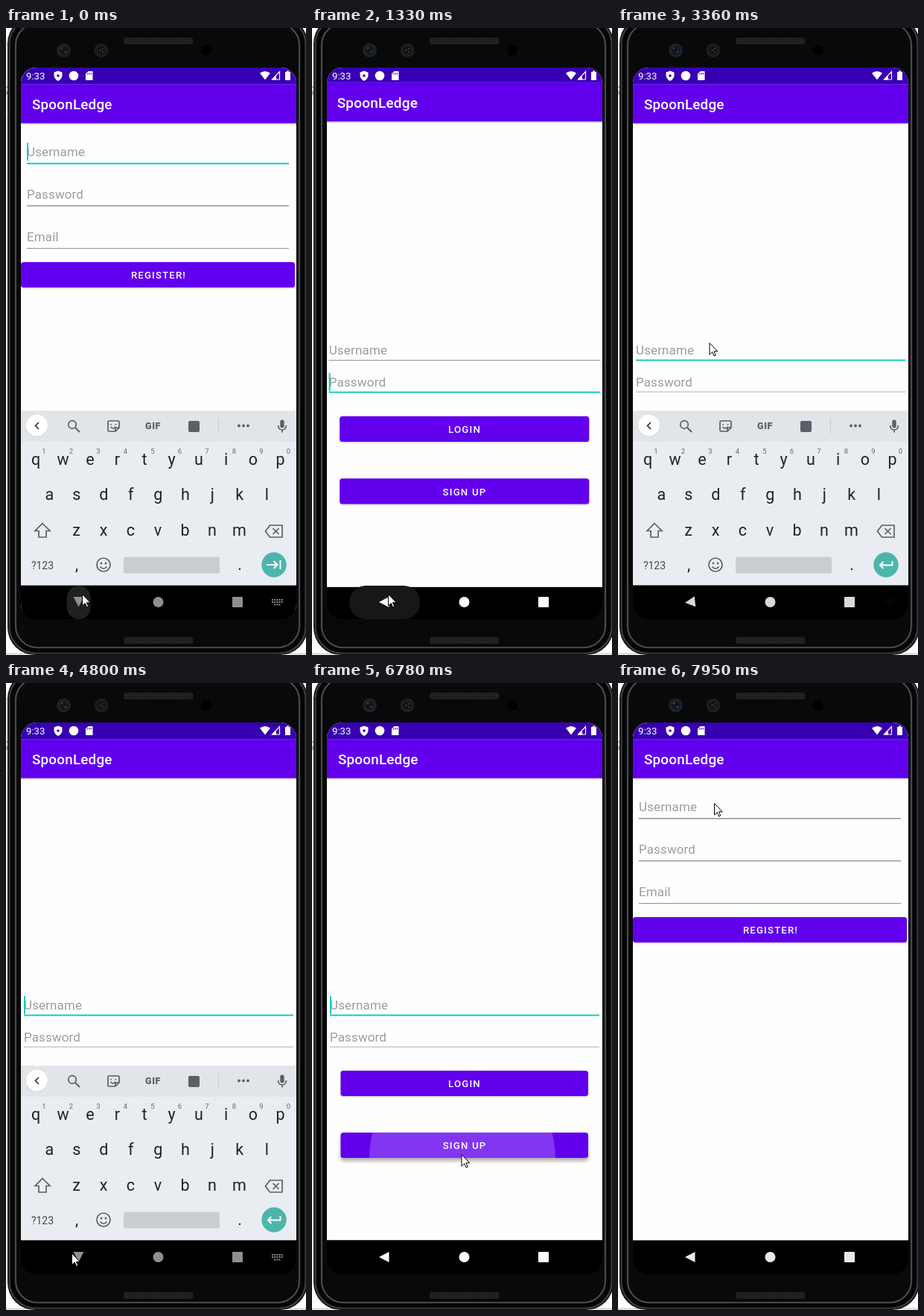
An HTML page that plays this animation: 403x841 px, repeating every 8000 ms.

```html
<!DOCTYPE html>
<html lang="en">
<head>
<meta charset="utf-8">
<title>Phone sign-up flow</title>
<style>
html, body { margin: 0; width: 100%; height: 100%; overflow: hidden; background: #fff; }
svg { display: block; width: 403px; height: 841px; font-family: Roboto, Inter, sans-serif; }
.title { font-size: 18.83px; font-weight: 500; letter-spacing: .2px; fill: #fff; }
.hint { font-size: 16.95px; letter-spacing: .15px; fill: #9c9c9c; }
.label { font-size: 13.18px; font-weight: 500; letter-spacing: 1.18px; fill: #fff; text-anchor: middle; }
.key { font-size: 21.5px; fill: #17262c; text-anchor: middle; }
.digit { font-size: 9.5px; fill: #5f6a70; text-anchor: middle; }
.icon { fill: none; stroke: #596166; stroke-width: 1.7; }
.btn { fill: #6200ee; }
.raised { filter: drop-shadow(0 1.5px 1px rgba(0,0,0,.25)); }
.teal { fill: #12cdbd; }
</style>
</head>
<body>
<svg viewBox="0 0 403 841">
  <defs>
    <clipPath id="screen"><rect x="20" y="53" width="370" height="740" rx="21"/></clipPath>
    <clipPath id="signClip"><rect x="38.5" y="603" width="332.5" height="34" rx="3.5"/></clipPath>
    <clipPath id="kbClip"><rect x="20" y="500" width="370" height="247.5"/></clipPath>
    <pattern id="mesh" width="3" height="3" patternUnits="userSpaceOnUse">
      <rect width="3" height="3" fill="#191919"/><circle cx="1.5" cy="1.5" r=".9" fill="#303030"/>
    </pattern>
    <linearGradient id="bar" x2="0" y2="1">
      <stop stop-color="#000" stop-opacity=".22"/><stop offset="1" stop-color="#000" stop-opacity="0"/>
    </linearGradient>
  </defs>

  <g id="phone">
    <path d="M0 22H3M0 121H3M0 839.5H403" stroke="#bbb"/>
    <path d="M0 79H2M0 84Q3 87 0 90" fill="none" stroke="#555"/>
    <rect x="2" y="-16" width="403" height="857" rx="37" fill="#111"/>
    <g fill="none">
      <rect x="4.5" y="-13.5" width="398" height="852" rx="35" stroke="#3b3f40" stroke-width="2"/>
      <rect x="8.5" y="-10" width="390" height="845" rx="32" stroke="#050505" stroke-width="5"/>
      <rect x="13" y="-6" width="381" height="837" rx="29" stroke="#55595a" stroke-width="1.6"/>
    </g>
    <rect x="14.5" y="-5" width="378" height="834.5" rx="28" fill="#090909"/>
    <rect x="158" y="13" width="93" height="9" rx="3" fill="url(#mesh)"/>
    <rect x="158" y="817" width="93" height="9" rx="3" fill="url(#mesh)"/>
    <circle cx="77.500" cy="30" r="9.500" fill="#1b2127"/><circle cx="77.500" cy="30" r="5.500" fill="#10161b"/>
    <path d="M74 28l2-2M79 33l2-2" stroke="#41586a" stroke-width="1.5"/>
    <circle cx="128" cy="30" r="9.500" fill="#1d1d1e"/><circle cx="128" cy="30" r="5" fill="#111"/>
    <path d="M125.500 30h2M129 28h1.500M129 32h1.500" stroke="#555" stroke-width="1.500"/>
    <circle cx="269" cy="30" r="7" fill="#000"/>
  </g>

  <g clip-path="url(#screen)">
    <rect x="20" y="53" width="370" height="740" fill="#000"/>
    <g id="login"></g>
    <g id="register"></g>
    <g clip-path="url(#kbClip)"><g id="board"></g></g>

    <g fill="#fff">
      <text x="27" y="69" font-size="13.2">9:33</text>
      <path d="M70 57.500L75.500 59.500V64Q75 68.500 70 71Q65 68.500 64.500 64V59.500Z"/>
      <circle cx="70" cy="64" r="1.800" fill="#3700b3"/>
      <circle cx="91" cy="64" r="6.300"/>
      <path d="M110.500 58H116.500V70H107V61.500Z"/>
      <path d="M109.700 60.500v2M112 60v2.500M114.300 60v2.500" stroke="#3700b3"/>
      <path d="M341 60.500Q348 55.500 355 60.500L348 69.500Z"/>
      <path d="M357.500 69H367.500V58.500Z" fill="none" stroke="#fff" stroke-width="1.200"/>
      <path d="M357 69.500H363V63.500Z"/>
      <path d="M375 59H377V57.500H380V59H382V70H375Z"/>
    </g>

    <rect id="navRipple" y="748" height="45" rx="22"/>
    <g id="nav">
      <path id="back" d="M90 770L103.500 763V777Z"/>
      <circle cx="204.500" cy="770" r="7"/>
      <rect x="304" y="763" width="14" height="14" rx="1"/>
    </g>
    <path id="kbIcon" d="M357 767h15M357 770h15M360 773.500h9" stroke="#8f8f8f" stroke-width="1.800" stroke-dasharray="2 1.200"/>
  </g>

  <path id="mouse" d="M.5 .5V16L4.200 12.600L6.700 18L8.800 17L6.400 11.800H11.300Z" fill="#fff" stroke="#000" stroke-width="1"/>
</svg>

<script>
const LOOP = 8000;
const STEPS = [0, 120, 270, 390, 510, 670, 970, 1090, 1210, 1330, 1480, 1610, 1760, 1910, 2060, 2210,
  2640, 2790, 2940, 3090, 3210, 3600, 3720, 3840, 3960, 4080, 4230, 4380, 4530, 4680, 4800,
  5330, 5450, 5580, 5730, 5880, 6010, 6140, 6290, 6410,
  6780, 6900, 7020, 7150, 7290, 7430, 7560, 7690, 7810, 7950];
const $ = id => document.getElementById(id);
const set = (id, attrs) => { for (const k in attrs) $(id).setAttribute(k, attrs[k]); };
const within = (t, ...spans) => spans.some(([a, b]) => t >= a && t < b);

// Linear interpolation through [time, value, ...] rows, held at both ends
function track(rows, t) {
  const n = rows.findIndex(r => r[0] > t);
  if (n === 0) return rows[0].slice(1);
  if (n < 0) return rows[rows.length - 1].slice(1);
  const a = rows[n - 1], b = rows[n], p = (t - a[0]) / (b[0] - a[0]);
  return a.slice(1).map((v, i) => v + (b[i + 1] - v) * p);
}

const text = (cls, x, y, s, id = '') => `<text class="${cls}" id="${id}" x="${x}" y="${y}">${s}</text>`;
const rect = (x, y, w, h, more) => `<rect x="${x}" y="${y}" width="${w}" height="${h}" ${more}/>`;
const button = (x, y, w, label, id) =>
  rect(x, y, w, 34, `rx="3.5" class="btn raised" id="${id}"`) + text('label', 205, y + 22.2, label);
const field = (x, y, w, lineY, label, id, grey) =>
  text('hint', x, y, label, id + 'Text') +
  rect(x, lineY, w, 1.2, `fill="${grey}" id="${id}Line"`) +
  `<g class="teal">${rect(x, lineY - .4, w, 2, `id="${id}Focus"`)}${rect(x, y - 18, 2, 24, `id="${id}Caret"`)}</g>`;

const page = body =>
  rect(20, 53, 370, 694.5, 'fill="#fefefe"') + rect(20, 53, 370, 22.5, 'fill="#3700b3"') +
  rect(20, 127.5, 370, 3, 'fill="url(#bar)"') + rect(20, 75.3, 370, 52.4, 'fill="#6200ee"') +
  text('title', 35, 109, 'SpoonLedge') + body + rect(20, 747.5, 370, 80, 'fill="#000"');

$('login').innerHTML = page(
  field(24, 438, 362, 445, 'Username', 'user', '#9a9a9a') +
  field(24, 480.5, 362, 487.5, 'Password', 'pass', '#bcbcbc') +
  button(38.5, 520, 332.5, 'LOGIN', 'loginBtn') +
  button(38.5, 603, 332.5, '', 'signBtn') +
  '<circle id="signRipple" cx="202" cy="637" fill="#fff" clip-path="url(#signClip)"/>' +
  text('label', 205, 625.2, 'SIGN UP'));

$('register').innerHTML = page(
  field(28, 172, 352, 181.2, 'Username', 'newUser', '#777') +
  field(28, 229, 352, 238, 'Password', 'newPass', '#858585') +
  field(28, 286, 352, 295, 'Email', 'mail', '#999') +
  button(20, 314, 368, 'REGISTER!', 'regBtn'));
for (const id of ['newPass', 'mail']) { $(id + 'Focus').remove(); $(id + 'Caret').remove(); }

const row = (s, x, y) => [...s].map((c, i) => text('key', x + 36.5 * i, y, c)).join('');
$('board').innerHTML =
  rect(20, 513.5, 370, 234, 'fill="#e9edf1"') + rect(20, 513.5, 370, 41.5, 'fill="#e1e5e9"') +
  row('qwertyuiop', 40, 585.5) + row('asdfghjkl', 58.3, 633) + row('zxcvbnm', 94.5, 680.5) +
  [...'1234567890'].map((c, i) => text('digit', 51 + 36.5 * i, 570.5, c)).join('') +
  `<circle cx="41.5" cy="533.5" r="15" fill="#ccd0d4"/><circle cx="41.5" cy="533" r="14.5" fill="#fff"/>
  <g class="icon">
    <path d="M44 529L39.500 533.500L44 538" stroke="#333"/>
    <circle cx="89" cy="532" r="5.300"/><path d="M93 536L99 542" stroke-width="2"/>
    <path d="M138.500 527H150.500Q152 527 152 528.500V536L147 541H138.500Q137 541 137 539.500V528.500Q137 527 138.500 527ZM152 536H147V541M140.500 535Q144 539 147 535M141 531v1.500M147.500 531v1.500"/>
    <path d="M285.500 523V544" stroke="#c6cace" stroke-width="1"/>
    <path d="M365.500 533Q366 539 371 539T376.500 533M371 539V542.500"/>
    <path d="M49 664.500L59 674.500H54V683H44V674.500H39Z"/>
    <path d="M354.500 667H371V683H354.500L348.500 675ZM358.500 671L366.500 679M366.500 671L358.500 679"/>
    <circle cx="131" cy="720" r="9"/><path d="M126.500 722.500Q131 728 135.500 722.500"/>
  </g>
  <g fill="#596166">
    <text x="197.500" y="537.500" font-size="12.500" font-weight="900" letter-spacing=".6" text-anchor="middle">GIF</text>
    <rect x="245" y="527" width="15" height="15" rx="2"/>
    <circle cx="313" cy="533.500" r="1.900"/><circle cx="319" cy="533.500" r="1.900"/><circle cx="325" cy="533.500" r="1.900"/>
    <rect x="368.300" y="525.500" width="5.400" height="11" rx="2.700"/>
    <circle cx="128" cy="718" r="1.400"/><circle cx="134" cy="718" r="1.400"/>
    <text x="49" y="725.500" font-size="14" text-anchor="middle" fill="#3f4b51">?123</text>
  </g>` +
  text('key', 95, 727, ',') + text('key', 314, 727, '.') +
  rect(158, 709.5, 129, 22, 'rx="2.5" fill="#c9ccd0"') +
  `<circle cx="360" cy="720" r="16.7" fill="#4db6ac"/>
  <g fill="none" stroke="#fff" stroke-width="2">
    <path id="tabKey" d="M350 720H364M359.500 715L364.500 720L359.500 725M368.500 714V726"/>
    <path id="enterKey" d="M368.500 715V720.500H352M356.500 716L352 720.500L356.500 725"/>
  </g>`;

const MOUSE = [[1610, 102, 759], [1910, 177, 520], [2060, 140, 450], [2210, 122.5, 422], [3600, 122.5, 422],
  [4680, 89, 781], [4800, 88, 764.5], [5580, 88, 764.5], [6290, 198, 633], [6410, 200.5, 632],
  [7150, 200.5, 632], [7690, 129, 161]];
const BOARD = [[0, 1], [120, .75], [270, .15], [390, 0], [2790, 0], [2940, .25], [3090, .9], [3210, 1],
  [5330, 1], [5450, .75], [5580, .15], [5730, 0]];
const DIM = [[0, 1], [120, .9], [390, 0], [2940, 0], [3720, 1], [5330, 1], [5450, .9], [5730, 0],
  [7810, 0], [7950, .2]];
const PRESSES = [0, 970, 5330];
const RIPPLE = [[0, 32, 1], [120, 60, 1], [270, 88, 1], [340, 95, 1], [400, 95, 1], [510, 95, .6], [640, 95, 0]];
const LOGIN_SCALE = [[1090, 1.1], [1210, 1.04], [1330, 1.0075], [1480, 1], [6900, 1], [7290, 1.05]];
// scale, opacity
const REGISTER = [[1090, 1, 1], [1210, .93, 0], [6900, .85, 0], [7020, .94, .8], [7150, .985, 1], [7290, 1, 1]];

const zoom = s => `translate(205 423) scale(${s}) translate(-205 -423)`;
const show = (id, on) => set(id, { visibility: on ? 'visible' : 'hidden' });

function draw(t) {
  const [mx, my] = track(MOUSE, t);
  set('mouse', { transform: `translate(${mx} ${my})` });

  const [scale, alpha] = track(REGISTER, t);
  set('register', { transform: zoom(scale), opacity: alpha });
  set('login', { transform: zoom(track(LOGIN_SCALE, t)[0]) });

  const [up] = track(BOARD, t);
  set('board', { transform: `translate(0 ${(1 - up) * 47})`, opacity: up });
  const first = t < 2000;
  set('tabKey', { opacity: +first });
  set('enterKey', { opacity: +!first });

  const [dim] = track(DIM, t);
  const grey = Math.round(255 - 112 * dim);
  set('nav', { fill: `rgb(${grey},${grey},${grey})` });
  const turn = Math.max(0, (dim - .3) / .7);
  set('back', { transform: `translate(${turn * .5} ${-turn * .5}) rotate(${-90 * turn} 97 770)` });
  set('kbIcon', { opacity: Math.max(0, dim - .3) / .7 });

  const press = t - PRESSES.filter(p => p <= t).pop();
  const [w, fade] = track(RIPPLE, press);
  const shade = Math.round(32 - 9 * (w - 32) / 63);
  set('navRipple', { x: 97.7 - w / 2, width: w, rx: Math.min(22, w / 2), opacity: fade, fill: `rgb(${shade},${shade},${shade})` });

  const onUser = t >= 2640;
  show('userFocus', onUser);
  show('userLine', !onUser);
  show('passFocus', !onUser);
  show('passLine', onUser);
  show('passCaret', within(t, [1210, 1760], [2210, 2640]));
  show('userCaret', within(t, [2640, 3210], [3720, 4230], [4800, 5730], [6290, LOOP]));
  $('userText').style.fill = within(t, [2640, 2940]) ? '#707070' : '';

  show('newUserFocus', first);
  show('newUserLine', !first);
  show('newUserCaret', within(t, [0, 270], [670, 1210]));

  const pressed = within(t, [6780, 7290]);
  set('signRipple', { r: track([[6780, 125], [6900, 190]], t)[0], opacity: pressed ? .21 : 0 });
  $('signBtn').style.filter = pressed ? 'drop-shadow(0 4px 2.5px rgba(0,0,0,.32))' : '';
}

let last = -1;
function tick() {
  const now = performance.now() % LOOP;
  const t = STEPS.filter(s => s <= now).pop();
  if (t !== last) draw(last = t);
  requestAnimationFrame(tick);
}
tick();
</script>
</body>
</html>
```
